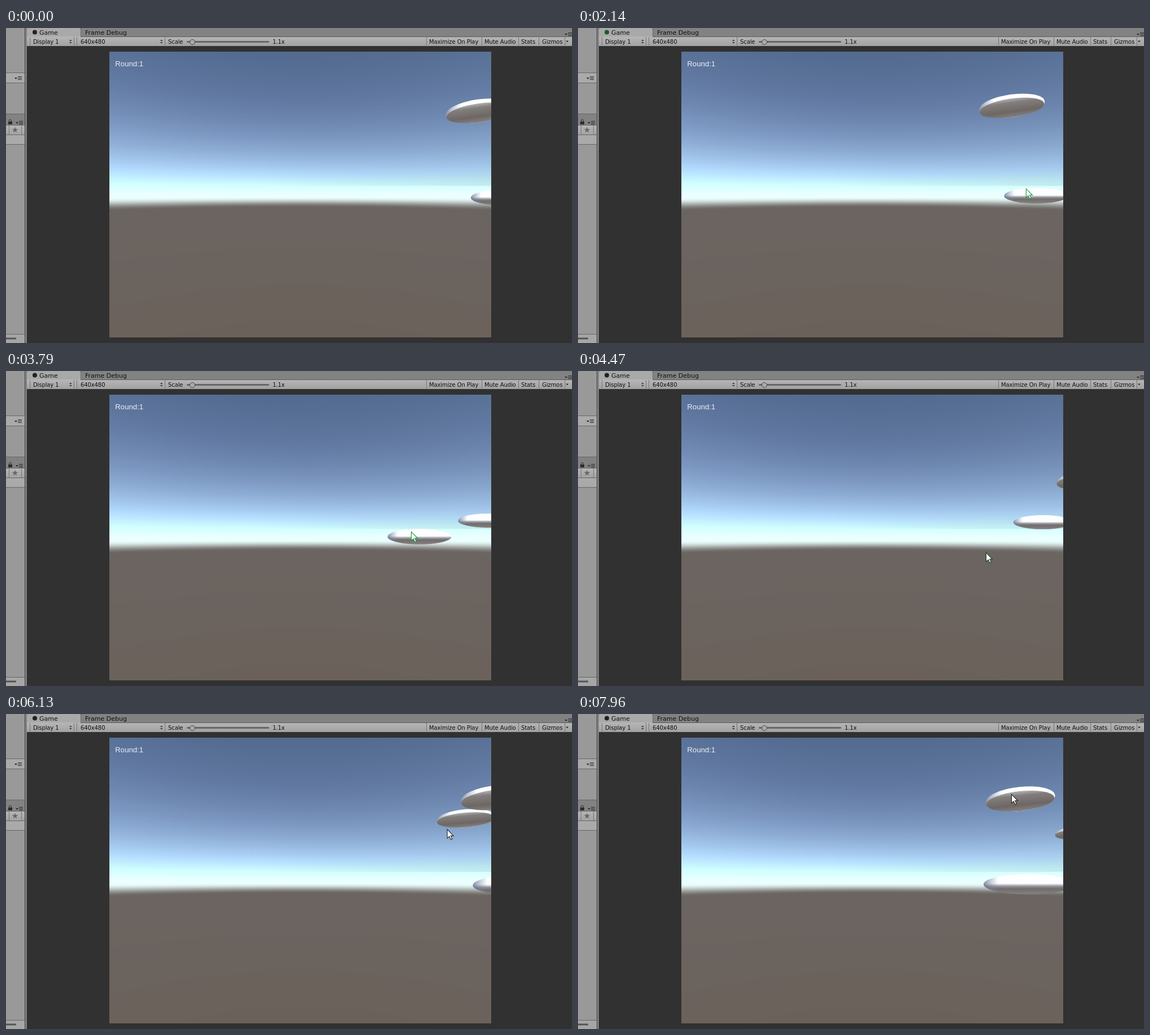
An HTML page with a canvas for the animation above (8 s loop, 1002x559 px).

```html
<!DOCTYPE html>
<html lang="en">
<head>
<meta charset="utf-8">
<title>Game view</title>
<style>
html, body { margin: 0; width: 100%; height: 100%; overflow: hidden; background: #313131; }
canvas, svg { position: absolute; left: 0; top: 0; display: block; }
text { font-family: "DejaVu Sans", sans-serif; fill: #111; white-space: pre; }
.tab { font-size: 11px; }
.bar { font-size: 10px; letter-spacing: -0.1px; }
.round { font: 13.2px "Liberation Sans", Arial, sans-serif; fill: #e9eef5; }
</style>
</head>
<body>
<canvas id="sky" width="1002" height="559"></canvas>
<svg id="stage" width="1002" height="559" viewBox="0 0 1002 559">
  <defs>
    <linearGradient id="barFill" x1="0" y1="0" x2="0" y2="1">
      <stop offset="0" stop-color="#b6b6b6"/><stop offset="1" stop-color="#a2a2a2"/>
    </linearGradient>
    <linearGradient id="top">
      <stop offset="0" stop-color="#8792a6"/><stop offset=".12" stop-color="#c6cedb"/>
      <stop offset=".25" stop-color="#fff"/><stop offset="1" stop-color="#fff"/>
    </linearGradient>
    <linearGradient id="face" x1="0" y1="0" x2="0" y2="1">
      <stop offset="0" stop-color="#b0b0b5"/><stop offset=".22" stop-color="#827e7c"/>
      <stop offset=".7" stop-color="#6d6764"/><stop offset="1" stop-color="#858180"/>
    </linearGradient>
    <linearGradient id="flat" x1="0" y1="0" x2="0" y2="1">
      <stop offset="0" stop-color="#fff"/><stop offset=".46" stop-color="#fcfdff"/>
      <stop offset=".6" stop-color="#92929a"/><stop offset=".72" stop-color="#716c6a"/>
      <stop offset="1" stop-color="#868281"/>
    </linearGradient>
    <linearGradient id="shade">
      <stop offset="0" stop-color="#66748f" stop-opacity=".8"/>
      <stop offset=".16" stop-color="#8090b0" stop-opacity="0"/>
    </linearGradient>
    <clipPath id="view"><rect x="183" y="42" width="676" height="507"/></clipPath>
  </defs>
  <g id="chrome"></g>
  <text class="round" x="193.3" y="68">Round:1</text>
  <g id="discs" clip-path="url(#view)"></g>
  <path id="cursor" d="M.5 .5V16.2L4.2 12.8L6.8 18.5L9.3 17.4L6.8 11.8H11.5Z" fill="#fff" stroke-width="1.1"/>
</svg>
<script>
const LOOP = 8000;
const $ = id => document.getElementById(id);
const mix = (a, b, k) => a + (b - a) * k;
const smooth = k => k * k * (3 - 2 * k);
const clamp = k => Math.min(1, Math.max(0, k));

function add(parent, tag, attrs, text) {
  const el = document.createElementNS('http://www.w3.org/2000/svg', tag);
  for (const k in attrs) el.setAttribute(k, attrs[k]);
  if (text) el.textContent = text;
  parent.appendChild(el);
  return el;
}

// Colour at a height above (negative) or below the horizon line
function skyColor(d) {
  const haze = Math.max(0, -d);
  const glow = (base, gain, reach) => Math.min(255, base + gain * Math.exp(-haze / reach));
  const sky = [glow(75, 160, 85), glow(99, 192, 78), glow(131, 180, 95)];
  const deep = clamp(d / 254);
  const ground = [107, mix(101, 97, deep), mix(98, 90, deep)];
  const k = smooth(clamp((d - 5) / 18));
  return `rgb(${sky.map((v, i) => Math.round(mix(v, ground[i], k)))})`;
}

// Lines of equal elevation bend with the 60 degree perspective
function paintSky() {
  const c = $('sky').getContext('2d');
  const grad = c.createLinearGradient(0, -254, 0, 254);
  for (let d = -254; d <= 254; d += 2) grad.addColorStop((d + 254) / 508, skyColor(d));
  c.beginPath();
  c.rect(183, 42, 676, 507);
  c.clip();
  c.fillStyle = grad;
  for (let x = 183; x < 859; x++) {
    c.setTransform(1, 0, 0, Math.hypot(1, (x - 520.5) / 439), x, 295);
    c.fillRect(0, -260, 1, 520);
  }
  c.resetTransform();
  const dim = c.createLinearGradient(450, 0, 859, 0);
  dim.addColorStop(0, 'rgba(90,112,140,0)');
  dim.addColorStop(1, 'rgba(90,112,140,.15)');
  c.fillStyle = dim;
  c.fillRect(450, 42, 409, 238);
}

function buildChrome() {
  const g = $('chrome');
  const box = (x, y, w, h, fill) => add(g, 'rect', { x, y, width: w, height: h, fill });
  const path = (d, fill) => add(g, 'path', { d, fill });
  const label = (x, y, s, cls) => add(g, 'text', { x, y, class: cls }, s);
  const menu = (x, y) => {
    path(`M${x} ${y - 1}h5l-2.5 3z`, '#2b2b2b');
    for (let i = -1; i < 2; i++) box(x + 6, y + i * 2.5 - .5, 7, 1, '#2b2b2b');
  };
  const picker = (x, y) => path(`M${x} ${y - 1}l2.3 -2.6l2.3 2.6zM${x} ${y + 1}l2.3 2.6l2.3 -2.6z`, '#333');

  // Left panels
  box(0, 0, 33, 559, '#999');
  box(0, 80, 33, 17, '#aaa');
  box(0, 152, 33, 20, '#828282');
  box(0, 172, 33, 18, 'url(#barFill)');
  box(0, 190, 33, 16, '#aaa');
  box(0, 544, 33, 15, '#a6a6a6');
  for (const y of [79, 97, 152, 172, 189, 206, 543]) box(0, y, 33, 1, '#666');
  for (const x of [5, 27]) box(x, 173, 1, 16, '#777');
  box(0, 549.5, 18, 3, '#555');
  box(33, 0, 4, 559, '#828282');
  box(33, 0, 1, 559, '#444');
  box(37, 32, 1, 527, '#292929');
  menu(15, 89);
  menu(17, 168);
  box(4, 166, 7, 5, '#2b2b2b');
  add(g, 'path', { d: 'M5.5 166v-1.5a2 2 0 0 1 4 0v1.5', fill: 'none', stroke: '#2b2b2b' });
  let star = '';
  for (let i = 0; i < 10; i++) {
    const a = i * Math.PI / 5, r = i % 2 ? 2.3 : 5.6;
    star += (i ? 'L' : 'M') + (16 + r * Math.sin(a)) + ' ' + (181 - r * Math.cos(a));
  }
  path(star + 'Z', '#666');

  // Tabs and toolbar
  box(37, 0, 965, 16, '#828282');
  path('M37 16V2L39 0H130L132 2V16Z', '#a9a9a9');
  box(132, 0, 1, 15, '#6c6c6c');
  box(37, 15, 965, 17, 'url(#barFill)');
  box(132, 15, 870, 1, '#5c5c5c');
  const dot = add(g, 'circle', { cx: 51, cy: 7.5, r: 4 });
  label(59, 12, 'Game', 'tab');
  label(140, 12, 'Frame Debug', 'tab');
  menu(989, 11);
  for (const x of [42, 120, 125, 281, 744, 842, 907, 943, 989]) box(x, 16, 1, 15, '#777');
  const words = { 'Display 1': 48, '640x480': 132, 'Scale': 287, '1.1x': 472,
    'Maximize On Play': 749, 'Mute Audio': 847, 'Stats': 912, 'Gizmos': 949 };
  for (const s in words) label(words[s], 27.5, s, 'bar');
  picker(112, 24);
  picker(273, 24);
  path('M991 22.5h5l-2.5 3z', '#333');
  add(g, 'rect', { x: 320, y: 23, width: 146, height: 3, rx: 1.5, fill: '#666' });
  add(g, 'circle', { cx: 330, cy: 25, r: 4.5, fill: '#aaa', stroke: '#444' });
  return dot;
}

// Each disc enters at the right edge and drifts steadily (pixels per second) until it is hit
const discs = [
  { enter: -911, hit: 3020, y: 157.4, rise: -6.3, rx: 58.5, ry: 20.3, tilt: -8 },
  { enter: 0, hit: 3910, y: 302.7, rise: -2.3, rx: 56.5, ry: 13.7 },
  { enter: 2573, hit: 5745, y: 259.8, rise: 4.7, rx: 52, ry: 12.5 },
  { enter: 4140, hit: 6352, y: 195, rise: -5, rx: 52, ry: 16, tilt: -5 },
  { enter: 5580, hit: LOOP, y: 304.5, rise: -1, speed: 59.3, rx: 80, ry: 18 },
  { enter: 4950, hit: LOOP, y: 147, rise: 1.2, speed: 45.5, rx: 61.5, ry: 21.3, tilt: -6 },
  { enter: 7650, hit: LOOP, y: 210, rise: 0, rx: 46, ry: 12, tilt: -5 }
];

function buildDisc(d) {
  const { rx, ry, tilt = 0 } = d;
  d.el = add($('discs'), 'g', {});
  add(d.el, 'ellipse', { rx, ry, fill: tilt ? 'url(#top)' : 'url(#flat)' });
  if (tilt) add(d.el, 'ellipse', { cx: -.5, cy: ry * .18, rx: rx - 1, ry: ry * .82, fill: 'url(#face)' });
  else add(d.el, 'ellipse', { rx, ry, fill: 'url(#shade)' });
  const a = tilt * Math.PI / 180;
  d.half = Math.hypot(rx * Math.cos(a), ry * Math.sin(a));
}

function placeDisc(d, t) {
  const on = t >= d.enter && t < d.hit;
  show(d.el, on);
  if (!on) return;
  const age = (Math.max(t, 745) - d.enter) / 1000;
  const x = 859 - (d.speed || 48.5) * age + d.half;
  d.el.setAttribute('transform', `translate(${x} ${d.y + d.rise * age}) rotate(${d.tilt || 0})`);
}

// Pointer stops: time, x, y
const stops = [[1670, 880, 290], [2140, 793, 285], [2840, 717, 138], [3790, 717, 285],
  [4300, 722, 322], [5170, 722, 322], [5640, 746, 270], [6240, 784, 198],
  [6880, 750, 241], [7140, 737, 237], [7960, 767, 142]];

function pointerAt(t) {
  const i = Math.max(1, stops.findIndex(s => s[0] >= t));
  const [t0, x0, y0] = stops[i - 1], [t1, x1, y1] = stops[i];
  const k = smooth(clamp((t - t0) / (t1 - t0)));
  return [mix(x0, x1, k), mix(y0, y1, k)];
}

// The picture refreshes in even bursts: first time, last time, count
const bursts = [[780, 1790, 10], [1930, 2840, 9], [3020, 3910, 8], [4090, 5000, 7],
  [5170, 6130, 6], [6220, 7140, 8], [7330, 7960, 5]];

function lastRefresh(now) {
  const t = now + 20;
  const burst = bursts.filter(b => b[0] <= t).pop();
  if (!burst) return 0;
  const [first, last, n] = burst;
  const step = (last - first) / (n - 1);
  return first + step * Math.min(n - 1, Math.floor((t - first) / step));
}

const show = (el, on) => el.setAttribute('visibility', on ? 'visible' : 'hidden');

function draw(now) {
  const t = lastRefresh(now);
  for (const d of discs) placeDisc(d, t);
  const cursor = $('cursor');
  show(cursor, t >= stops[0][0]);
  cursor.setAttribute('transform', `translate(${pointerAt(t)})`);
  cursor.setAttribute('stroke', t < 4090 ? '#1b9236' : t < 5360 ? '#1c4030' : '#222');
  dot.setAttribute('fill', t >= 780 && t < 3020 ? '#1f5a24' : '#222');
}

paintSky();
const dot = buildChrome();
discs.forEach(buildDisc);
const start = performance.now();
function loop() {
  draw((performance.now() - start) % LOOP);
  requestAnimationFrame(loop);
}
loop();
</script>
</body>
</html>
```
